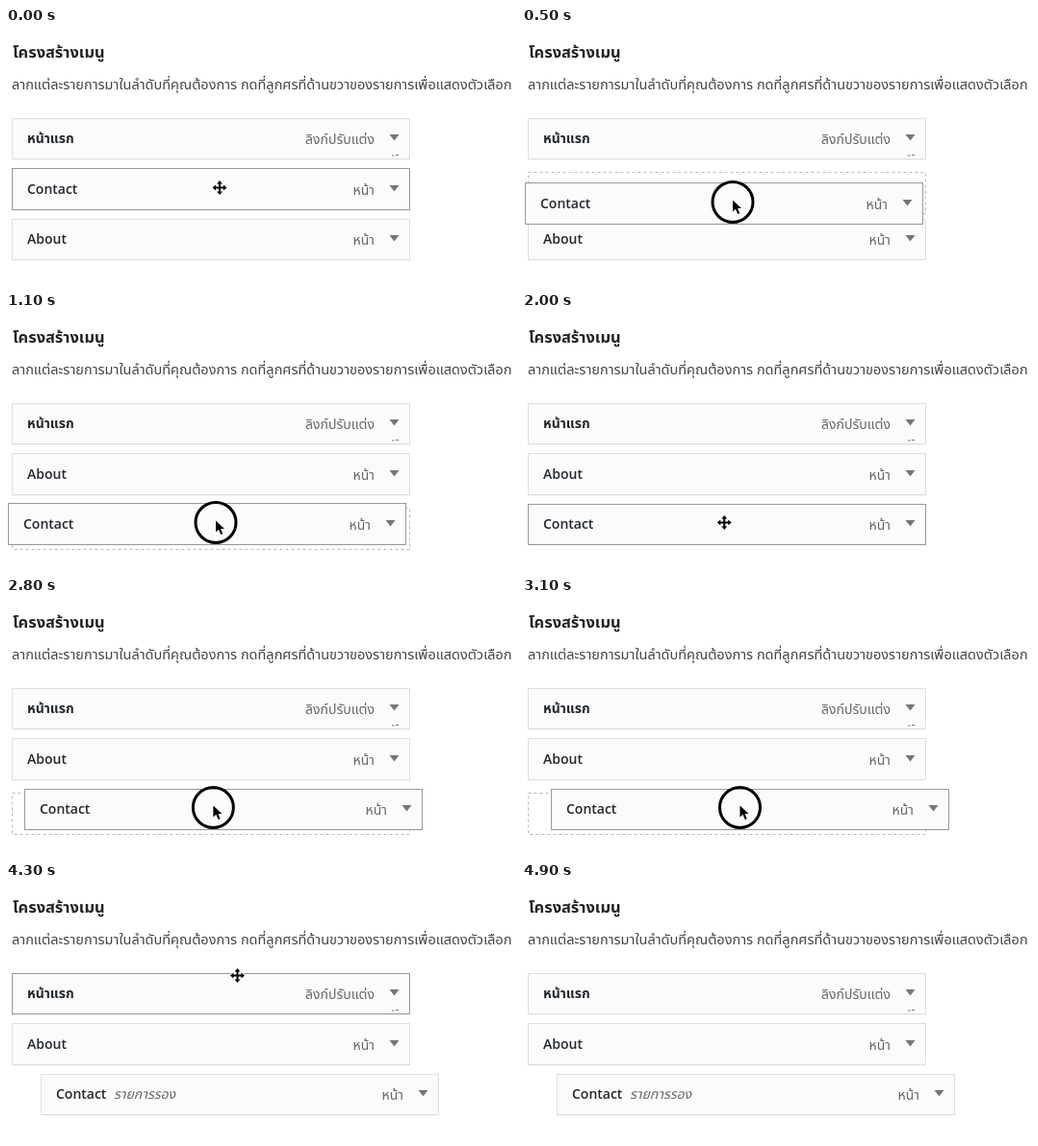
An HTML page that plays this animation: 530x268 px, repeating every 5.1 s.

```html
<!DOCTYPE html>
<html lang="th">
<head>
<meta charset="utf-8">
<style>
  html, body { margin: 0; width: 100%; height: 100%; overflow: hidden; background: #fff; }
  svg { display: block; }
  text { font: 500 14px "Open Sans", "Noto Sans Thai", "Noto Sans", sans-serif; fill: #666; white-space: pre; }
  .head { font-size: 16.4px; font-weight: 700; fill: #222; }
  .intro { font-size: 14.5px; fill: #444; }
  .title { font-weight: 600; fill: #23282d; }
  .sub { font-size: 14px; font-style: italic; }
  .type { text-anchor: end; }
  .box { fill: #fbfbfb; stroke: #dfdfdf; }
  .active .box { stroke: #999; }
  .shade { fill: #000; opacity: .04; }
  .arrow { fill: #72777c; }
  #slot { fill: none; stroke: #b8b8b8; stroke-dasharray: 3 3; }
  .pointer { stroke: #fff; stroke-width: 2; stroke-linejoin: round; paint-order: stroke; }
</style>
</head>
<body>
<svg width="530" height="268" viewBox="0 0 530 268">
  <text class="head" x="7" y="31">โครงสร้างเมนู</text>
  <text class="intro" x="6" y="64">ลากแต่ละรายการมาในลำดับที่คุณต้องการ กดที่ลูกศรที่ด้านขวาของรายการเพื่อแสดงตัวเลือก</text>
  <g id="home"></g>
  <g id="about"></g>
  <rect id="slot" width="413" height="43"/>
  <g id="contact"></g>
  <g id="press">
    <circle r="21" fill="none" stroke="#000" stroke-width="3"/>
    <path class="pointer" d="M0-2V10L3 7.3 5.2 12.6 7.3 11.7 5.1 6.5H9Z"/>
  </g>
  <path id="move" class="pointer"
    d="M0-7.5 3-4H1V-1H4V-3L7.5 0 4 3V1H1V4H3L0 7.5-3 4H-1V1H-4V3L-7.5 0-4-3V-1H-1V-4H-3Z"/>
</svg>
<script>
const LOOP = 5100, STEP = 100;
const LEFT = 6, TOP = 94, ROW = 52.5, INDENT = 30;
const el = id => document.getElementById(id);
const rowY = n => TOP + n * ROW;

function fillItem(id, title, type, extra = '') {
  el(id).innerHTML = `<rect class="shade" y="43" width="414" height="1"/>
    <rect class="box" x=".5" width="413"/>
    <text class="title" x="16" y="26">${title}</text>
    <text class="type" x="377" y="27">${type}</text>
    <path class="arrow" d="M392.5 17h10l-5 6.5z"/>${extra}`;
}
fillItem('home', 'หน้าแรก', 'ลิงก์ปรับแต่ง',
  '<path d="M395 39h2.5m1.5-.5h3" fill="none" stroke="#777"/>');
fillItem('about', 'About', 'หน้า');
fillItem('contact', 'Contact', 'หน้า',
  '<text class="sub" id="child" x="76" y="26">รายการรอง</text>');

const place = (id, x, y) => el(id).setAttribute('transform', `translate(${x} ${y})`);
const show = (id, on) => el(id).style.display = on ? '' : 'none';
const hover = (id, on) => el(id).classList.toggle('active', on);

// Edges snap to whole pixels: a half-pixel row gets a box one pixel taller.
function placeItem(id, x, y) {
  const base = Math.ceil(y), grow = base - Math.floor(y);
  const box = el(id).querySelector('.box');
  box.setAttribute('y', .5 - grow);
  box.setAttribute('height', 42 + grow);
  place(id, Math.round(x), base);
}

function draw(now) {
  const t = Math.floor(now % LOOP / STEP) * STEP;
  const within = (a, b) => t >= a && t < b;
  const run = (a, b) => Math.min(1, Math.max(0, (t - a) / (b - a)));

  const cx = 222 - 6 * run(300, 700) + 2 * run(900, 1100)
    - 15.5 * run(1900, 2100) + 38 * run(2500, 3500) ** .9;
  const cy = 166.5 + 30 * run(300, 700) - 12 * run(700, 900) + 34 * run(900, 1100)
    - 122 * run(4200, 4300);

  const down = within(400, 1500), across = within(2600, 3800);
  const pressed = within(100, 1500) || within(2300, 3800);
  const swapped = t >= 600, nested = t >= 3800;

  let x = LEFT, y = rowY(t < 400 ? 1 : 2);
  if (down) { x = cx - 216; y = cy - 20; }
  if (across) x = cx - 196.5;
  if (nested) x = LEFT + INDENT;

  const indented = within(600, 800) || across && x >= LEFT + INDENT;

  placeItem('home', LEFT, rowY(0));
  placeItem('about', LEFT, rowY(swapped ? 1 : 2));
  placeItem('contact', x, y);
  place('slot', LEFT + (indented ? INDENT : 0) + .5, Math.floor(rowY(swapped ? 2 : 1)) + 4.5);
  place('press', cx, cy);
  place('move', cx, cy);

  show('slot', down || across);
  show('child', nested);
  show('press', pressed);
  show('move', !pressed && t < 4400);
  hover('home', t === 4300);
  hover('contact', t < 4300);
}

function tick() {
  draw(performance.now());
  requestAnimationFrame(tick);
}
tick();
</script>
</body>
</html>
```
